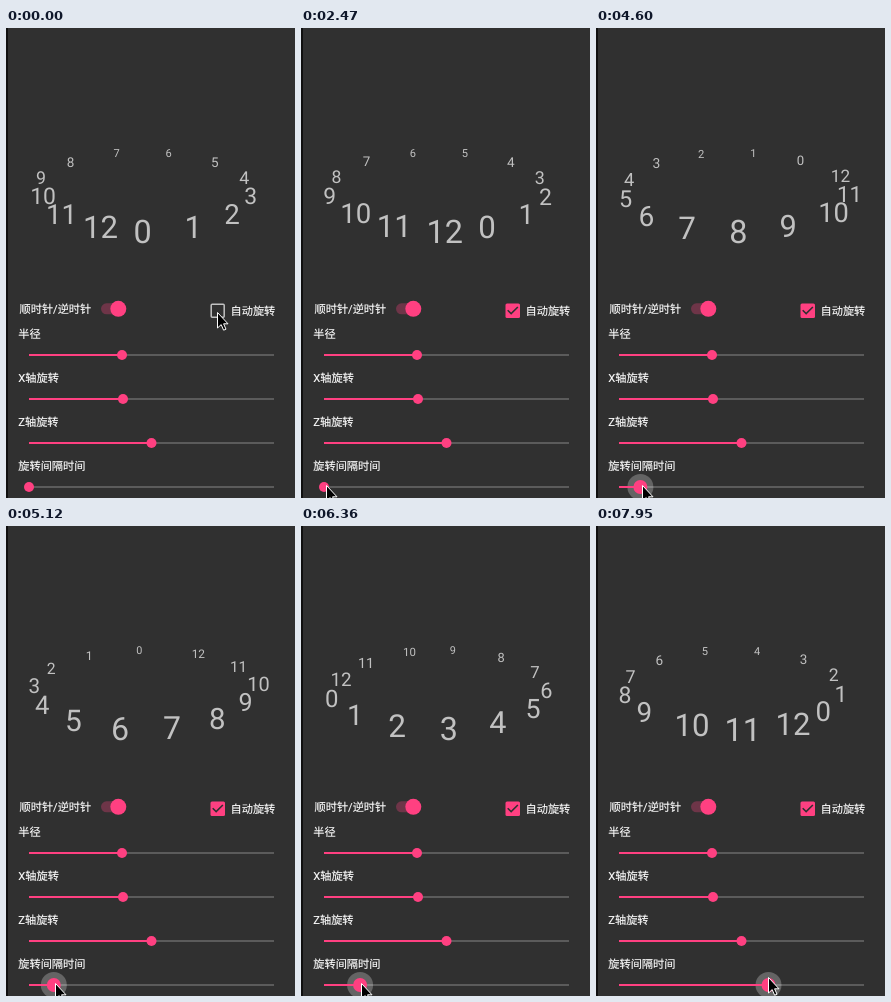
An HTML page that plays this animation: 289x470 px, repeating every 8000 ms.

```html
<!DOCTYPE html>
<html lang="zh-CN">
<head>
<meta charset="utf-8">
<title>旋转</title>
<style>
html, body { margin: 0; width: 100%; height: 100%; overflow: hidden; background: #303030; }
svg { display: block; width: 289px; height: 470px; font-family: Roboto, "Noto Sans CJK SC", "Noto Sans CJK", sans-serif; }
text { text-rendering: geometricPrecision; }
.label { font-size: 11.2px; fill: #fff; stroke: #fff; stroke-width: .15px; }
.digit { font-size: 32.4px; fill: #c1c1c1; text-anchor: middle; }
.pink { fill: #ff4081; }
</style>
</head>
<body>
<svg viewBox="0 0 289 470">
  <rect width="289" height="470" fill="#303030"/>
  <rect width="2" height="470" fill="#101010"/>
  <g id="ring"></g>
  <text class="label" x="13.5" y="284.8">顺时针/逆时针</text>
  <rect x="95" y="275.3" width="23" height="11" rx="5.5" fill="#6e3548"/>
  <circle class="pink" cx="112.3" cy="280.8" r="8"/>
  <circle id="tapRipple" cx="212" cy="282.5" fill="#fff"/>
  <rect id="boxOff" x="205.2" y="276.2" width="13" height="13" rx="1" fill="none" stroke="#c1c1c1" stroke-width="1.5"/>
  <g id="boxOn">
    <rect class="pink" x="204.5" y="275.5" width="14.5" height="14.5" rx="1.5"/>
    <path d="M10 17l-5-5 1.4-1.4L10 14.2l7.6-7.6L19 8z" transform="translate(202.1 273.1) scale(.806)" fill="#303030"/>
  </g>
  <text class="label" x="224.5" y="286.8">自动旋转</text>
  <g id="sliders"></g>
  <path id="cursor" d="M.5 .5V16L4.2 12.6L6.6 18.2L9 17.2L6.6 11.8H11Z" fill="#000" stroke="#fff"/>
</svg>
<script>
const LOOP = 8000, COUNT = 13, SLOT = 2 * Math.PI / COUNT;
const PRESS = 3050, RELEASE = 7950;
const $ = id => document.getElementById(id);

function set(el, attrs) {
  for (const k in attrs) el.setAttribute(k, attrs[k]);
}
function add(parent, tag, attrs, text = '') {
  const el = document.createElementNS('http://www.w3.org/2000/svg', tag);
  set(el, attrs);
  el.textContent = text;
  return parent.appendChild(el);
}

// Progress from 0 to 1 between two times
const ramp = (t, from, to) => Math.min(1, Math.max(0, (t - from) / (to - from)));

const digits = Array.from({ length: COUNT }, (_, i) =>
  add($('ring'), 'text', { class: 'digit', y: 11.5 }, i));

function slider(name, y, x) {
  const g = $('sliders');
  add(g, 'text', { class: 'label', x: 12.3, y: y - 17.5 }, name);
  add(g, 'rect', { x: 23, y: y - .7, width: 245, height: 1.4, fill: '#6e6e6e' });
  const ripple = add(g, 'circle', { cx: x, cy: y, r: 0, fill: '#fff', opacity: .25 });
  const bar = add(g, 'rect', { class: 'pink', x: 23, y: y - 1, width: x - 23, height: 2 });
  const thumb = add(g, 'circle', { class: 'pink', cx: x, cy: y, r: 5 });
  return { ripple, bar, thumb };
}
const [, , , delay] = [['半径', 116], ['X轴旋转', 117], ['Z轴旋转', 145.5], ['旋转间隔时间', 23]]
  .map(([name, x], i) => slider(name, 327 + 44 * i, x));

// One single step, then continuous turning that speeds up a little
function turnAt(t) {
  return 27 * ramp(t, 1720, 2060) + 196 * ramp(t, 3130, 5650) + 193.3 * ramp(t, 5650, RELEASE);
}

function drawRing(t) {
  const turn = turnAt(t) * Math.PI / 180;
  digits.forEach((el, i) => {
    const a = turn + i * SLOT, depth = Math.cos(a);
    const x = 136.7 + 108.7 * Math.sin(a) + (i > 9 ? 8.3 : 0);
    const y = 163.6 + 39.5 * depth;
    set(el, { transform: `translate(${x} ${y}) scale(${(2 + depth) / 3})` });
  });
}

function drawCheckbox(t) {
  const on = t >= 200;
  set($('boxOff'), { visibility: on ? 'hidden' : 'visible' });
  set($('boxOn'), { visibility: on ? 'visible' : 'hidden' });
  set($('tapRipple'), { r: 15 * ramp(t, 80, 330), opacity: .2 * (1 - ramp(t, 350, 700)) });
}

// The drag starts gently and ends in a fast pull; the cursor holds the thumb
function drawDrag(t) {
  const u = ramp(t, PRESS, RELEASE), pull = u ** 8;
  const x = 23 + 38 * Math.sqrt(u) + 111.5 * pull;
  set(delay.bar, { width: x - 23 });
  set(delay.thumb, { cx: x, r: 5 + 2 * ramp(t, 2990, 3150) });
  set(delay.ripple, { cx: x, r: 13 * ramp(t, 2990, 3250) });

  const a = ramp(t, 350, 800), b = ramp(t, 1060, 1410), c = ramp(t, 1500, 2380);
  const cx = 211 - 30 * a - 29 * b + (x + 1.5 - 2 * pull - 152) * c;
  const cy = 284 + 17 * a + 52 * b + (104 - 6 * pull) * c;
  set($('cursor'), { transform: `translate(${Math.round(cx)} ${Math.round(cy)})` });
}

const start = performance.now();
function frame() {
  const t = (performance.now() - start) % LOOP;
  drawRing(t);
  drawCheckbox(t);
  drawDrag(t);
  requestAnimationFrame(frame);
}
frame();
</script>
</body>
</html>
```
